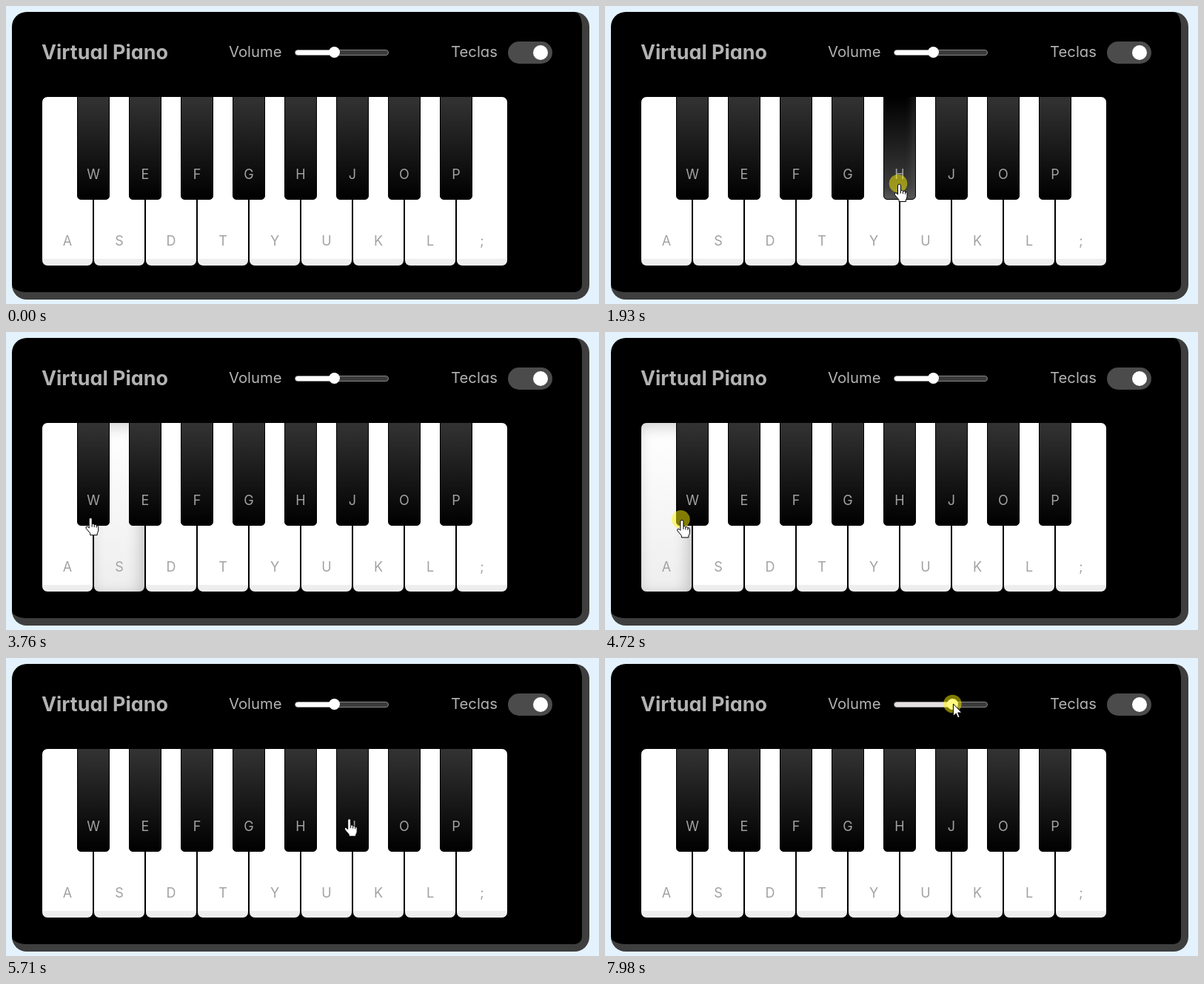
These frames come from a looping animation (801x403 px, 8 s). An HTML page:

```html
<!DOCTYPE html>
<html lang="en">
<head>
<meta charset="utf-8">
<title>Virtual Piano</title>
<style>
  * { box-sizing: border-box; }
  html, body { margin: 0; width: 100%; height: 100%; overflow: hidden; background: #e3f2fd; }
  body { position: relative; font-family: Inter, sans-serif; font-feature-settings: "cv11"; }
  body div, svg { position: absolute; }
  .panel { left: 8px; top: 8px; width: 780px; height: 389px; background: #000; border-radius: 20px;
    border: 0 solid #3e3e3e; border-width: 0 10px 10px 0; }
  .label { top: 47px; line-height: 30px; font-size: 20.3px; color: #b2b2b2; white-space: nowrap; }
  .title { left: 48px; font-size: 26.9px; font-weight: 700; }
  .track { left: 390px; top: 59px; width: 127px; height: 8px; border-radius: 4px; overflow: hidden;
    background: #3b3b3b; border: 1px solid #858585; }
  .fill { left: 0; top: 0; height: 6px; background: #fff; }
  .fill.held { background: #e6e0e3; }
  .thumb { top: 55px; width: 15px; height: 15px; margin-left: -7.5px; border-radius: 50%; background: #fff; }
  .switch { left: 678px; top: 48px; width: 60px; height: 30px; border-radius: 15px; background: #4b4b4b; }
  .knob { left: 34px; top: 5px; width: 20px; height: 20px; border-radius: 50%; background: #fff; }
  #keys { left: 0; top: 122px; }
  .key { border: 1px solid #000; color: #a2a2a2; font-size: 18px; line-height: 20px; text-align: center; }
  .key span { position: absolute; left: 0; width: 100%; bottom: 23px; }
  .white { width: 70px; height: 230px; border-radius: 8px; background: linear-gradient(#fff 96%, #eee 4%); }
  .white.active { box-shadow: inset -5px 5px 20px rgba(0,0,0,.2); background: linear-gradient(#fff, #eee); }
  .black { width: 44px; height: 140px; border-radius: 0 0 5px 5px; background: linear-gradient(#333, #000); }
  .black.active { box-shadow: inset -5px -10px 10px rgba(255,255,255,.1); background: linear-gradient(#000, #434343); }
  svg { left: 0; top: 0; width: 801px; height: 403px; }
</style>
</head>
<body>
<div class="panel"></div>
<div class="label title">Virtual Piano</div>
<div class="label" style="left:301px">Volume</div>
<div class="track"><div class="fill"></div></div><div class="thumb"></div>
<div class="label" style="left:601px">Teclas</div>
<div class="switch"><div class="knob"></div></div>
<div id="keys"></div>
<svg viewBox="0 0 801 403">
  <g id="pointer">
    <circle id="halo" r="12.300" fill="#fff500" fill-opacity=".5"/>
    <g id="hand" transform="translate(-5.5 1)" fill="#fff" stroke="#000" stroke-linejoin="round">
      <path d="M5 14V2a2 2 0 0 1 4 0V8.500q2.500-1.200 3 1q2.500-1 3 1q2.500-.5 2.500 2V17q0 2-1.500 4V23.500H6.500V21L1 14.500q-1-2.500 1-2.700q1.500 0 3 2.200z"/>
      <path d="M9 8.500v4M12 9.500v3.500M15 10.500v3" fill="none"/>
    </g>
    <path id="arrow" transform="translate(.5 0)" d="M.5 0V16.500L4.300 13L6.800 18.800L9.200 17.800L6.700 12H12Z" fill="#fff" stroke="#000"/>
  </g>
</svg>
<script>
const LOOP = 8000, HOLD = 100, GLOW = 150, DRAG_START = 6740;
const $ = s => document.querySelector(s);

const addKeys = (letters, type, left) => [...letters].map((letter, i) => {
  const key = document.createElement('div');
  key.className = 'key ' + type;
  key.style.left = left + 70 * i + 'px';
  key.innerHTML = `<span>${letter}</span>`;
  $('#keys').append(key);
  return key;
});
const whites = addKeys('ASDTYUKL;', 'white', 48);
const blacks = addKeys('WEFGHJOP', 'black', 96);

// Where the pointer rests or turns: time, x, y
const turns = [
  [200, 352, 408], [700, 225, 310], [960, 290, 304], [1250, 290, 304], [1850, 396, 240], [2400, 396, 240],
  [2760, 86, 276], [3250, 300, 285], [3780, 112, 250], [4330, 300, 285], [4660, 92, 254],
  [5450, 704, 218], [6110, 4, 214], [6360, 4, 214], [6640, 444, 63], [DRAG_START, 444, 62],
  [7000, 502, 62], [7420, 394, 62], [7740, 561, 62], [LOOP, 468, 62]
];

function pointerAt(t) {
  const next = Math.max(1, turns.findIndex(turn => turn[0] > t));
  const [t0, x0, y0] = turns[next - 1], [t1, x1, y1] = turns[next];
  const u = Math.max(0, (t - t0) / (t1 - t0)), s = u * u * (3 - 2 * u);
  return [x0 + (x1 - x0) * s, y0 + (y1 - y0) * s];
}

function keyAt([x, y]) {
  if (y < 122 || y > 352) return null;
  const n = Math.round((x - 118) / 70);
  const onBlack = y < 262 && Math.abs(x - 118 - 70 * n) < 22;
  return onBlack && blacks[n] || whites[Math.floor((x - 48) / 70)] || null;
}

// Single clicks, then steady clicking during the sweeps
const steady = Array.from({ length: 16 }, (_, i) => 2580 + 175 * i);
const presses = [700, 980, 1550, 1850, ...steady].map(time => ({ time, key: keyAt(pointerAt(time)) }));

const show = (id, on) => $(id).style.display = on ? '' : 'none';

function draw(t) {
  const [x, y] = pointerAt(t), overKey = keyAt([x, y]), dragging = t >= DRAG_START;
  const pressedWithin = ms => presses.filter(p => t >= p.time && t < p.time + ms);
  const lit = pressedWithin(GLOW).map(p => p.key);
  for (const key of [...whites, ...blacks]) key.classList.toggle('active', lit.includes(key));

  const thumb = dragging ? Math.min(510, Math.max(397, x)) : 443.7;
  $('.thumb').style.left = thumb + 'px';
  $('.fill').style.width = thumb - 391 + 'px';
  $('.fill').classList.toggle('held', dragging);

  $('#pointer').setAttribute('transform', `translate(${x} ${y})`);
  show('#halo', dragging || pressedWithin(HOLD).length);
  show('#hand', overKey);
  show('#arrow', !overKey);
}

const start = performance.now();
function tick() {
  draw((performance.now() - start) % LOOP);
  requestAnimationFrame(tick);
}
tick();
</script>
</body>
</html>
```
